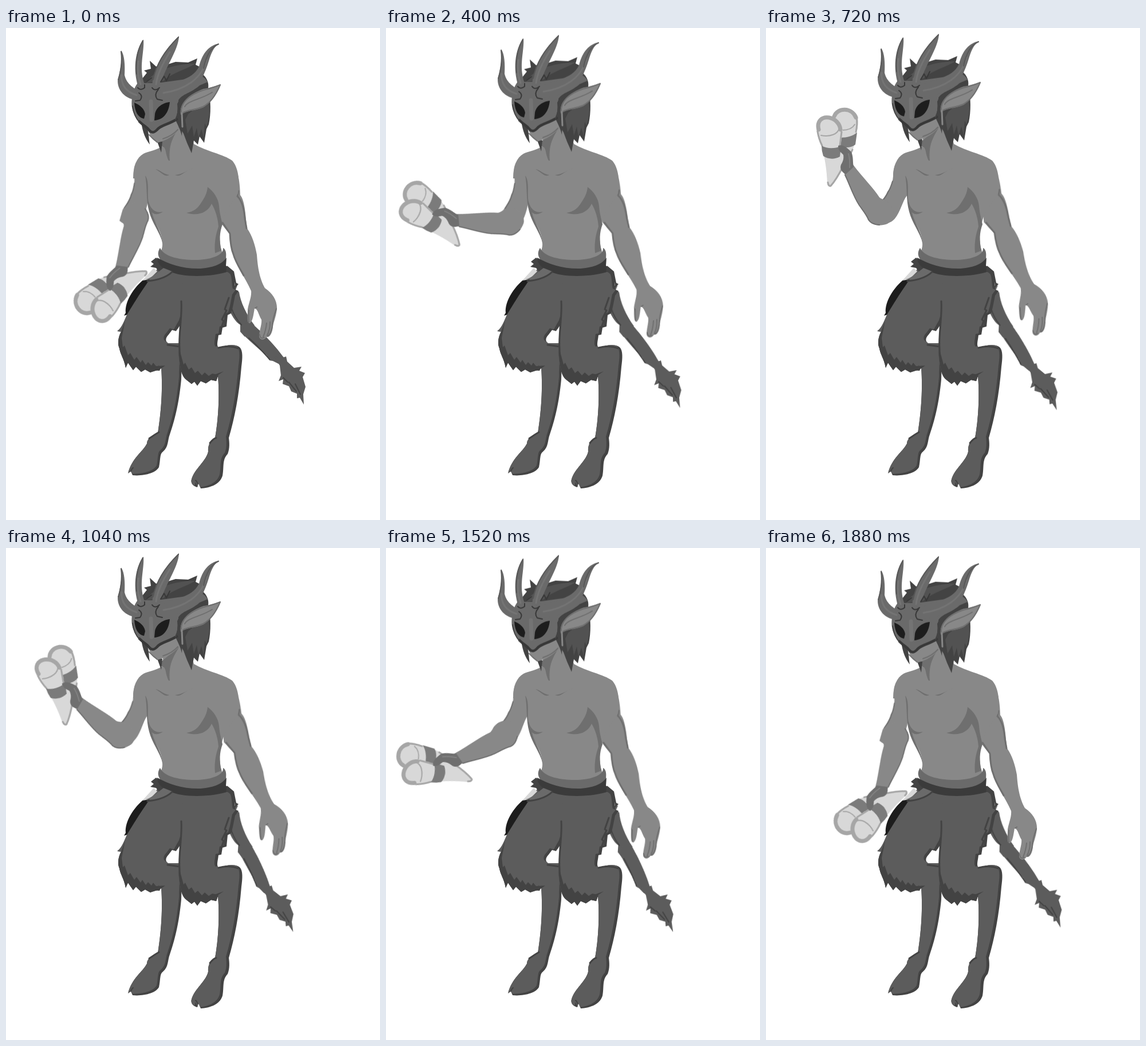
An HTML page for the animation above (1.92 s loop, 653 by 857 pixels).

```html
<!DOCTYPE html>
<html lang="en">
<head>
<meta charset="utf-8">
<title>Faun with ice cream</title>
<style>
  html, body { margin: 0; width: 100%; height: 100%; overflow: hidden; background: #fff; }
  svg { display: block; width: 100%; height: 100%; }

  .skin { fill: #888; }
  .skin-shade { fill: #6f6f6f; }
  .fur { fill: #5c5c5c; }
  .fur-dark { fill: #434343; }
  .hair { fill: #525252; }
  .mask { fill: #6a6a6a; }
  .black { fill: #1d1d1d; }
  .cream { fill: #d8d8d8; }
  .wrap { fill: #7b7b7b; }
  .line { fill: none; stroke: #6f6f6f; stroke-width: 3; stroke-linecap: round; stroke-linejoin: round; }
  .dark { stroke: #434343; }
  .ink { stroke: #383838; }
  .rim { stroke: #a6a6a6; }
  .glow { stroke: #747474; }
  .edge { stroke: #585858; }
  .thin { stroke-width: 2; }
  .bold { stroke-width: 4.5; }
  .wide { stroke-width: 7; }

  /* The drawing advances every 40 ms, so each span is cut into steps. */
  .head, .upper, .fore, .arm, .tail, .tail-mid, .tuft { animation: 1920ms infinite; }
  .head { animation-name: bob; }
  .upper { animation-name: upper; transform-origin: 247px 245px; }
  .fore { animation-name: fore; transform-origin: 202px 322px; }
  .arm { animation-name: swing; transform-origin: 380px 265px; }
  .tail { animation-name: tail; transform-origin: 396px 465px; }
  .tail-mid { animation-name: tail-mid; transform-origin: 424px 527px; }
  .tuft { animation-name: tuft; transform-origin: 478px 580px; }

  @keyframes bob {
    0%, 100% { transform: none; animation-timing-function: steps(24); }
    50% { transform: translateY(-5.5px); animation-timing-function: steps(24); }
  }
  @keyframes swing {
    0% { transform: rotate(0deg); animation-timing-function: steps(18); }
    37.5% { transform: rotate(-5deg); animation-timing-function: steps(8); }
    54.167% { transform: rotate(-5deg); animation-timing-function: steps(17); }
    89.583%, 100% { transform: rotate(0deg); }
  }
  @keyframes upper {
    0% { transform: rotate(-8deg); animation-timing-function: steps(10); }
    20.833% { transform: rotate(-9deg); animation-timing-function: steps(8); }
    37.5% { transform: rotate(0deg); animation-timing-function: steps(8); }
    54.167% { transform: rotate(-1deg); animation-timing-function: steps(8); }
    70.833% { transform: rotate(3deg); animation-timing-function: steps(9); }
    89.583%, 100% { transform: rotate(-8deg); }
  }
  @keyframes fore {
    0% { transform: translate(22px, 3px) rotate(-129.4deg); animation-timing-function: steps(10); }
    20.833% { transform: translate(17.5px, 13px) rotate(-52.8deg); animation-timing-function: steps(8); }
    37.5% { transform: translate(0, 0) rotate(0deg); animation-timing-function: steps(6); }
    50% { transform: translate(2px, 3px) rotate(-3deg); animation-timing-function: steps(2); }
    54.167% { transform: translate(2.5px, 4px) rotate(-17deg); animation-timing-function: steps(2); }
    58.333% { transform: translate(0, 2px) rotate(-31deg); animation-timing-function: steps(6); }
    70.833% { transform: translate(-5px, -4px) rotate(-43.6deg); animation-timing-function: steps(9); }
    89.583%, 100% { transform: translate(22px, 3px) rotate(-129.4deg); }
  }
  @keyframes tail {
    0% { transform: rotate(0deg); animation-timing-function: steps(34); }
    70.833% { transform: rotate(5deg); animation-timing-function: steps(14); }
    100% { transform: rotate(1deg); }
  }
  @keyframes tail-mid {
    0% { transform: rotate(0deg); animation-timing-function: steps(34); }
    70.833% { transform: rotate(20deg); animation-timing-function: steps(14); }
    100% { transform: rotate(4.3deg); }
  }
  @keyframes tuft {
    0% { transform: rotate(0deg); animation-timing-function: steps(34); }
    70.833% { transform: rotate(-31deg); animation-timing-function: steps(14); }
    100% { transform: rotate(-6.7deg); }
  }
</style>
</head>
<body>
<svg viewBox="0 0 653 857">
  <defs>
    <path id="legL" d="M264 420C245 445 228 472 212 498C206 510 203 522 194 528L201 529C195 540 195 550 198 558C200 570 206 575 209 592L213 583L222 596L227 590L236 599L243 595L252 600L256 596L268 597L271 590C273 620 273 655 265 706C257 712 247 712 246 724C239 738 219 750 213 776L218 772L221 779C240 781 262 775 267 765C270 752 268 742 274 738C284 730 282 718 286 708C294 685 302 655 306 612L308 549L283 549C278 546 278 540 284 534L290 526L297 528L306 512L330 430Z"/>
    <path id="legR" d="M268 424L390 420C402 432 398 448 401 456L406 458L400 466L396 486L393 497L387 500L385 520L378 522L376 534L371 535C370 545 367 552 371 557C385 552 400 550 408 556C414 562 413 575 411 590C407 640 399 680 389 714C390 722 391 732 387 742C377 752 381 765 378 780C373 796 355 801 340 802L336 793L334 800C326 798 322 792 324 786C329 768 349 755 353 738C352 725 358 718 365 714C371 680 373 640 370 606L367 615L358 613L349 619L340 615L334 623L329 616L324 620L314 612C306 605 304 590 302 575C300 555 304 530 304 510L305 475Z"/>
    <clipPath id="clipL"><use href="#legL"/></clipPath>
    <clipPath id="clipR"><use href="#legR"/></clipPath>
  </defs>

  <g class="tail">
    <path class="fur" d="M380 452L404 448L401 456L407 460C409 476 420 500 434 518L424 538L418 531L417 538L409 529L409 517C400 512 394 500 386 484Z"/>
    <g class="tail-mid">
      <path class="fur" d="M427 513C440 523 468 550 485 574C488 582 480 588 474 584L466 580L460 579L455 570C443 561 428 547 416 536C410 524 418 510 427 513Z"/>
      <path class="line dark thin" d="M424 540C440 554 450 566 460 577"/>
      <g class="tuft">
        <path class="fur" d="M468 572C480 575 486 574 489 572L491 581L503 592L516 590L512 597L522 601L518 608L523 625L519 638L520 656L513 644L508 645L508 637L498 633L494 624L483 620L484 612L476 615L480 605L478 588Z"/>
        <path class="line dark thin" d="M494 617L507 633M505 620L514 638M484 609L492 617"/>
      </g>
    </g>
    <path class="line dark thin" d="M393 486Q400 506 411 517"/>
  </g>

  <g class="legs">
    <path class="black" d="M243 436C222 452 207 478 209 496L206 501L217 498C224 474 240 455 252 438Z"/>
    <use href="#legL" class="fur-dark"/>
    <g clip-path="url(#clipL)"><use href="#legL" class="fur" x="-4" y="-3"/></g>
    <path class="fur-dark" d="M208 510L201 529C195 542 195 552 198 558C200 570 206 575 209 592L213 583L222 596L227 590L236 599L243 595L252 600L268 595L278 588L262 589L257 583L254 588L248 582L244 587L238 578L235 583L228 573L224 578L217 566L213 570L207 553L204 556L202 540Z"/>
    <path class="line dark" d="M282 552L304 555M306 512L298 524M250 715Q263 706 267 704"/>
    <use href="#legR" class="fur-dark"/>
    <g clip-path="url(#clipR)"><use href="#legR" class="fur" x="-5" y="-2"/></g>
    <path class="fur" d="M268 424L310 430L306 476L304 500L296 510L260 470Z"/>
    <path class="line dark" d="M306 476C308 505 301 530 303 560Q303 580 308 596"/>
    <path class="fur-dark" d="M303 560C303 585 305 605 314 612L324 620L329 616L334 623L340 615L349 619L358 613L367 615L371 604L380 598L366 603L360 602L354 606L347 600L342 605L335 597L330 601L324 591L319 595L313 583L310 586Z"/>
    <path class="line dark" d="M371 557Q390 552 405 558M356 723Q362 715 367 714M389 470L382 490L385 492L377 508L380 510L373 532"/>
    <path class="line dark thin" d="M218 772Q220 767 222 766M335 794Q333 789 331 788"/>
  </g>

  <path class="cream" d="M258 418L238 440L250 438L264 424Z"/>
  <path class="fur-dark" d="M262 400L253 407L258 411L252 416L262 418L270 428L285 418Z"/>

  <g class="upper">
    <path class="skin" d="M250 222C230 222 222 238 222 258C221 272 216 280 212 285C207 297 200 302 194 310L186 328C200 344 214 344 225 332C235 320 238 302 246 292C258 280 260 240 250 222Z"/>
    <path class="line thin" d="M221 267Q217 280 213 286C208 297 203 301 198 307"/>
  </g>
  <g class="fore">
    <path class="cream" d="M117 158C120 138 150 134 160 153C163 166 158 180 157 190L153 208C146 226 134 246 120 262L113 190Z"/>
    <path class="line rim wide" d="M119 154C125 138 150 138 157 156"/>
    <path class="line rim" d="M158 156Q160 168 157 181M151 212Q145 226 136 239"/>
    <path class="line rim thin" d="M155 168Q149 178 133 178"/>
    <path class="wrap" d="M130 191C142 191 152 188 159 182L156 203C150 208 142 209 130 207Z"/>
    <path class="cream" d="M88 178C86 160 100 150 112 154C124 156 134 168 134 180L130 205C130 222 136 234 133 244L115 275C111 278 108 276 107 272C106 245 103 230 98 208C92 195 90 188 88 178Z"/>
    <path class="line rim wide" d="M92 177C88 162 98 154 110 156C121 158 129 167 130 177"/>
    <path class="line rim" d="M90 180Q92 193 98 205M132 181L129 205M134 242C127 256 121 266 113 275Q109 276 108 269"/>
    <path class="line rim thin" d="M128 174C126 185 112 190 96 187"/>
    <path class="wrap" d="M97 205C108 211 120 210 131 206L129 224C118 230 108 228 100 223Q97 214 97 205Z"/>
    <path class="skin" d="M134 248C142 262 150 285 160 303C168 318 176 325 178 334C184 344 198 346 212 341C224 334 226 318 216 306C209 298 202 299 198 295C188 279 170 262 152 238Z"/>
    <path class="line thin" d="M138 256C146 272 152 292 163 309C171 320 176 326 179 334Q184 342 198 343"/>
    <path class="skin-shade" d="M126 205C135 202 142 209 149 216C153 226 151 232 153 242L139 255C133 251 128 246 131 238C135 232 136 226 135 221C132 217 126 215 126 205Z"/>
    <path class="line thin" style="stroke:#828282" d="M144 219Q147 230 146 243"/>
  </g>

  <g class="arm">
    <path class="skin" d="M375 233C402 230 408 255 409 291C418 302 418 330 421 349C430 362 435 378 438 395C440 425 445 440 452 453C466 462 474 476 473 490C471 505 467 512 466 520C465 532 460 540 455 538C450 546 441 543 442 535C443 525 447 515 446 508C441 500 440 490 434 488C432 500 431 510 426 514C420 516 422 500 422 490C424 478 429 468 428 458C418 435 402 415 397 395C391 380 392 365 390 358C384 352 380 345 374 338Z"/>
    <path class="line" d="M406 284L404 293Q415 304 417 332L420 349M378 339L391 358Q392 382 397 394C400 406 409 420 415 431"/>
    <path class="line thin" d="M472 489Q465 508 465 520Q462 535 456 537M424 492Q423 503 424 512M443 534Q444 543 451 539M455 514Q454 526 449 538M461 512Q461 526 456 535M435 488L438 486"/>
  </g>

  <g class="torso">
    <path class="skin" d="M276 160L273 206C262 213 248 215 240 219C228 226 222 240 222 262L244 262C246 285 248 305 252 323C262 342 272 355 273 375C274 385 268 390 269 408L381 408C381 395 374 385 374 375C372 360 373 350 377 340C380 320 396 305 405 288C409 265 405 242 395 231C380 220 350 215 328 202L316 160Z"/>
    <path class="skin-shade" d="M352 277C362 284 371 297 372 310C373 322 375 330 378 342C373 355 372 370 376 388L365 392C363 370 368 355 371 346C370 332 366 318 359 306C352 322 335 328 315 322C328 320 335 314 341 304C347 295 351 288 352 277Z"/>
    <path class="skin-shade" d="M261 246C268 246 275 255 285 256C277 261 270 250 261 246ZM327 244C318 246 310 255 295 256C306 261 312 248 327 244Z"/>
    <path class="skin-shade" d="M271 198L302 172C296 186 283 198 286 231L284 231C277 217 281 207 271 206Z"/>
    <path class="skin-shade" d="M243 257C251 267 246 290 249 303C253 317 262 323 274 320C265 326 259 325 255 321C258 338 270 350 274 376C268 354 255 340 250 320C244 300 247 275 243 257Z"/>
  </g>

  <g class="belt">
    <path class="mask" d="M269 383C262 394 266 404 282 413C315 432 376 426 384 401C385 392 384 386 379 383C381 398 350 405 325 404C300 403 276 398 269 383Z"/>
    <path fill="#3b3b3b" d="M264 400C285 412 310 420 340 419C365 417 378 410 385 400L384 414L390 418L388 424C365 433 310 436 286 424C272 418 264 411 264 400Z"/>
    <path class="mask" d="M275 418C262 428 256 434 244 438L264 438C276 435 284 430 290 424Z"/>
    <path class="line dark" d="M247 441Q276 438 290 425"/>
    <path class="fur-dark" d="M386 414L398 424L402 444L406 446L400 452C400 440 396 428 384 424Z"/>
  </g>

  <g class="head">
    <path class="fur-dark" d="M234 105L238 88L246 78L241 74L253 71L251 57L262 67L280 64L296 59L318 60L334 53L331 64L343 70L336 75C350 83 355 95 353 105C358 125 358 150 354 168L350 176L346 200L338 189L335 203L328 196L324 218L316 200L310 184L300 168Z"/>
    <path class="hair" d="M245 96C255 75 290 63 331 62C315 72 290 78 275 92ZM318 150L352 122C357 142 355 158 350 172L347 166L345 190L341 176L336 192L333 174L328 190L325 170L317 184L313 160Z"/>
    <path class="fur-dark" d="M236 164C239 183 243 192 251 203C249 192 250 186 247 176ZM263 195L271 217L273 198Z"/>
    <path class="skin" d="M246 170C248 186 258 193 264 200C280 196 293 188 301 178L300 150Z"/>
    <path class="line thin" d="M250 186Q257 194 264 199M274 193Q290 188 300 177"/>
    <path class="fur-dark" d="M294 115L316 108C312 125 305 135 309 150L307 188C304 175 300 170 296 160Z"/>
    <path class="mask" d="M230 96C222 105 218 125 220 138C222 150 228 160 236 167C246 173 250 180 257 182C264 180 270 172 282 168C296 163 301 152 300 130C305 117 325 112 338 100L352 94C345 82 335 80 322 88L264 96Z"/>
    <path class="line ink bold" d="M233 163C242 172 246 172 250 178Q256 185 263 178C270 169 282 169 298 159"/>
    <path class="line dark thin" d="M221 136Q223 153 233 164M300 132Q302 150 296 160M302 126C308 115 330 112 343 100"/>
    <path class="line glow wide" d="M253 128L254 160"/>
    <path class="black" d="M224 130C234 134 242 141 243 150L241 158C231 156 225 147 224 130ZM286 129C274 130 262 138 260 150L259 161C275 160 284 148 286 129Z"/>
    <g class="mask">
      <path d="M201 39C207 47 208 65 207 82C211 99 224 105 237 113L234 126C212 126 195 112 195 92C199 75 203 60 201 39Z"/>
      <path d="M240 20C242 42 231 68 242 98L231 103C222 75 224 42 240 20Z"/>
      <path d="M302 14C301 40 276 70 269 102L255 104C256 68 279 36 302 14Z"/>
      <path d="M372 27C356 38 356 58 347 77C335 108 302 126 264 124L266 106C287 94 325 93 337 67C343 43 355 30 372 27Z"/>
    </g>
    <path class="line glow" d="M202 82Q200 108 228 117M231 58Q228 80 235 98M286 42Q265 75 262 98M350 55C342 90 310 108 275 113"/>
    <path class="line edge thin" d="M201 41Q204 65 196 90M239 22Q225 45 228 80M301 16Q264 52 257 90M371 28Q352 36 345 70"/>
    <path class="line ink thin" d="M230 104Q235 110 242 104L242 99M255 104Q260 111 268 104M266 107Q258 116 264 124L273 126M232 113Q240 118 234 126L226 127"/>
    <path class="line ink thin" d="M246 93L254 87M270 94L276 84L280 92L286 80"/>
    <path class="skin" d="M305 151C302 130 320 115 345 106C358 104 368 100 375 98C370 113 358 130 345 138C332 144 316 143 305 151Z"/>
    <path class="line thin" d="M306 149C304 130 320 116 345 108Q362 104 374 99C366 118 356 131 344 137C330 143 318 142 308 148M312 137C318 126 342 124 360 112"/>
    <path class="line" style="stroke:#888" d="M307 148L308 172"/>
  </g>
</svg>
</body>
</html>
```
